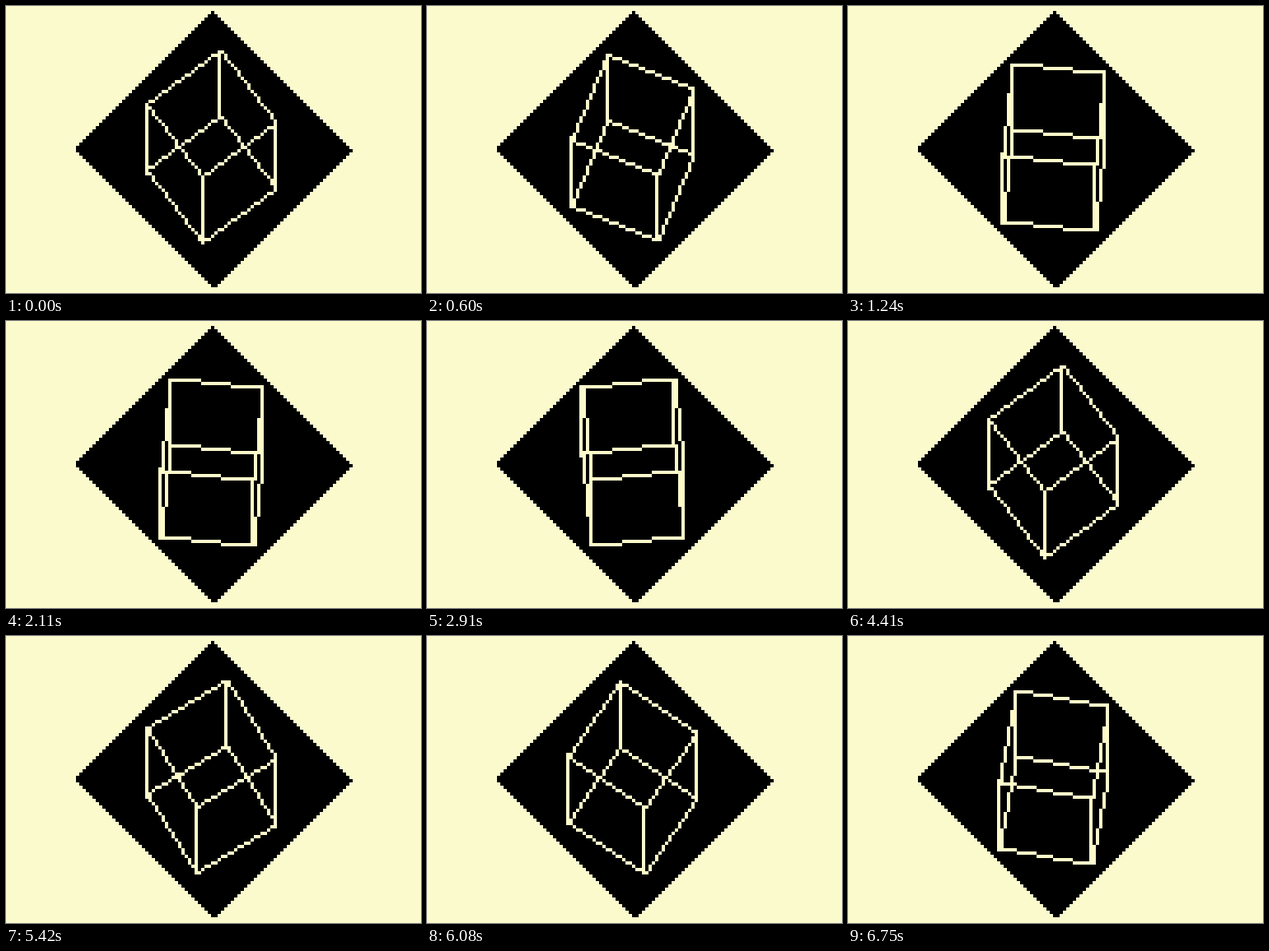
An HTML page with a canvas for the animation above (6.78 s loop, 504 by 349 pixels).

```html
<!DOCTYPE html>
<html lang="en">
<head>
<meta charset="utf-8">
<title>Turning cube</title>
<style>
html, body { margin: 0; width: 100%; height: 100%; overflow: hidden; background: #fbfacd; }
canvas { display: block; }
</style>
</head>
<body>
<canvas id="stage" width="504" height="349"></canvas>
<script>
const ctx = document.getElementById('stage').getContext('2d');
const LOOP = 6780, STEPS = 203;
const CELL = 4, LEFT = 85, TOP = 6;
const PAPER = '#fbfacd', LINE = '#fdfbca';
const CX = 41, CY = 31, RADIUS = 20.02, HEIGHT = 20;

// [step, turn in degrees]: the spin slows slightly over the loop
const TURN = [[0, 7.4], [37, 140.8], [63, 230.8], [110, 385], [132, 457.4], [162, 553.1], [202, 684.7]];

const slope = (a, b) => (b[1] - a[1]) / (b[0] - a[0]);

function tangent(i) {
  const before = TURN[Math.max(i - 1, 0)];
  const after = TURN[Math.min(i + 1, TURN.length - 1)];
  return slope(before, after);
}

function turnAt(step) {
  let i = 0;
  while (i < TURN.length - 2 && step >= TURN[i + 1][0]) i++;
  const [x0, y0] = TURN[i], [x1, y1] = TURN[i + 1];
  const w = x1 - x0, u = (step - x0) / w, v = 1 - u;
  return v * v * (1 + 2 * u) * y0 + u * u * (3 - 2 * u) * y1 +
    w * u * v * (v * tangent(i) - u * tangent(i + 1));
}

function cells(col, row, w = 1, h = 1) {
  ctx.fillRect(LEFT + col * CELL, TOP + row * CELL, w * CELL, h * CELL);
}

// Edge of equal runs on the top face, repeated on the base.
// Flat edges start at the outer end, steep ones at the right end.
function edge(p, q) {
  const flat = Math.abs(q[0] - p[0]) >= Math.abs(q[1] - p[1]);
  const swap = flat ? Math.abs(q[1] - CY) > Math.abs(p[1] - CY) : q[0] > p[0];
  const [a, b] = swap ? [q, p] : [p, q];
  const dx = b[0] - a[0], dy = b[1] - a[1];
  const n = Math.max(Math.abs(dx), Math.abs(dy));
  for (let i = 0; i <= n; i++) {
    const k = (i + 0.5) / (n + 1);
    const x = a[0] + (flat ? i * Math.sign(dx) : Math.trunc(k * dx));
    const y = a[1] + (flat ? Math.trunc(k * dy) : i * Math.sign(dy));
    cells(x, y);
    cells(x, y + HEIGHT);
  }
}

function diamond() {
  ctx.fillStyle = '#000';
  for (let r = 0; r < 84; r++) {
    const a = r < 42 ? 41 - r : r - 42;
    const b = r <= 42 ? 41 + r : 125 - r;
    cells(a, r, b - a + 1);
  }
}

function cube(turn) {
  const top = [0, 1, 2, 3].map(i => {
    const a = (turn + i * 90) * Math.PI / 180;
    return [Math.floor(CX + RADIUS * Math.sin(a)), CY - Math.trunc(RADIUS * Math.cos(a))];
  });
  ctx.fillStyle = LINE;
  top.forEach(([x, y], i) => {
    edge(top[i], top[(i + 1) % 4]);
    cells(x, y, 1, HEIGHT + 1);
  });
}

function draw(now) {
  const step = Math.floor((now % LOOP) / LOOP * STEPS);
  ctx.fillStyle = PAPER;
  ctx.fillRect(0, 0, 504, 349);
  diamond();
  cube(turnAt(step));
}

let start;
function tick(now) {
  if (start === undefined) start = now;
  draw(Math.max(0, now - start));
  requestAnimationFrame(tick);
}
draw(0);
requestAnimationFrame(tick);
</script>
</body>
</html>
```
